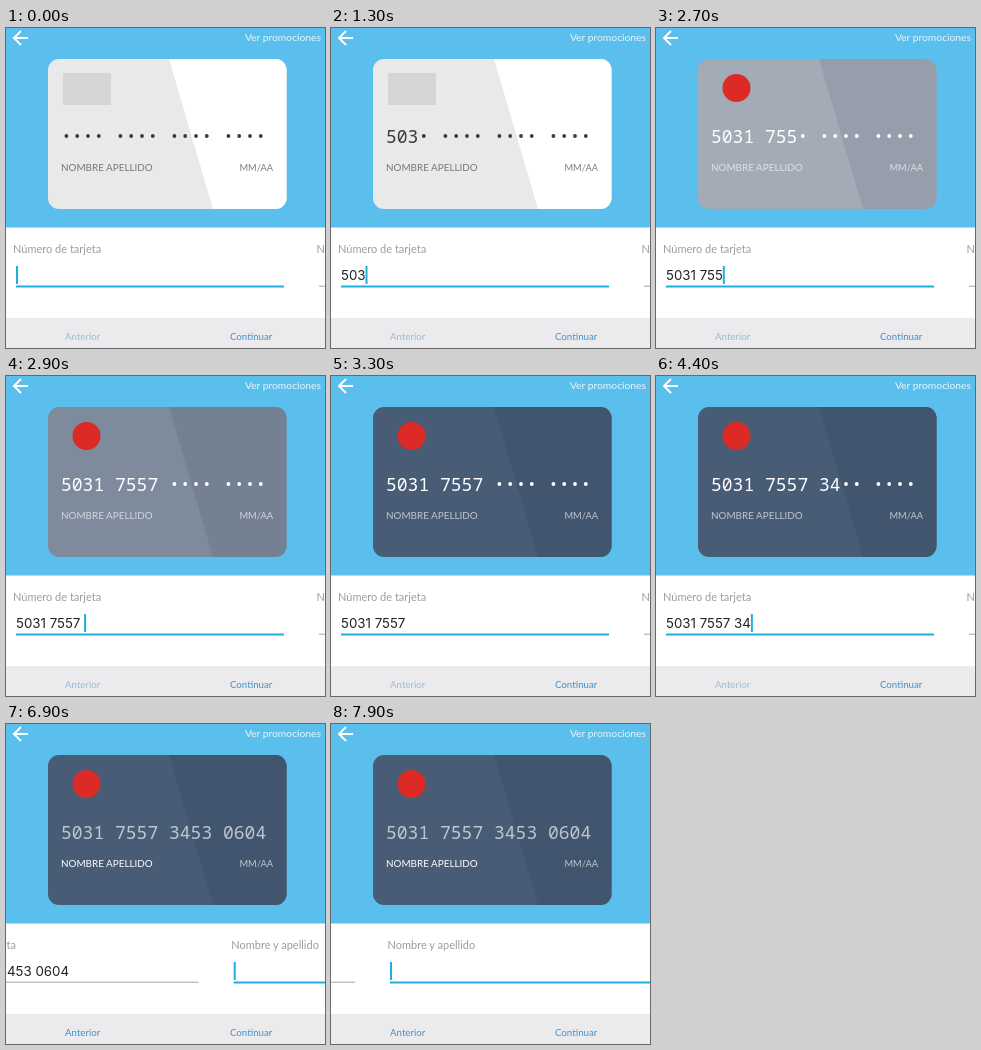
Write an HTML page that moves like this. It is 319 px wide and 320 px high and loops after 8000 ms.

```html
<!DOCTYPE html>
<html lang="es">
<head>
<meta charset="utf-8">
<style>
html, body { margin: 0; width: 100%; height: 100%; overflow: hidden; background: #fff; }
svg { display: block; width: 319px; height: 320px; font-family: Lato, sans-serif; }
text { white-space: pre; }
.label { font-size: 11px; fill: #9c9c9c; }
.button { font-size: 9.7px; fill: #438fc6; }
#digits { font: 18px "Noto Sans Mono", monospace; }
#typed { font: 13.3px Inter, sans-serif; fill: #222; }
</style>
</head>
<body>
<svg viewBox="0 0 319 320">
  <rect width="319" height="199.5" fill="#5bbfee"/>
  <path d="M15 3L8 10l7 7M8 10h14" fill="none" stroke="#fff" stroke-width="2"/>
  <text x="315" y="13" text-anchor="end" font-size="10.3" fill="#e6f6fd">Ver promociones</text>

  <clipPath id="shape"><rect x="42" y="31" width="238.5" height="150" rx="11"/></clipPath>
  <g clip-path="url(#shape)">
    <path id="left" d="M42 31h239v150H42z"/>
    <path id="right" d="M163 31h118v150H207z"/>
  </g>
  <rect id="chip" x="57" y="45" width="48" height="32" rx="1.5" fill="#d5d5d5"/>
  <circle id="brand" cx="80.5" cy="60" r="14" fill="#dc2a27"/>
  <g id="ink">
    <g id="number"><text id="digits" x="55" y="115"></text></g>
    <text id="holder" x="55" y="143" font-size="9.9">NOMBRE APELLIDO</text>
    <text x="267" y="143" text-anchor="end" font-size="9.3" opacity=".65">MM/AA</text>
  </g>

  <g id="form">
    <text class="label" x="7" y="225">Número de tarjeta</text>
    <text id="typed" x="10" y="252"></text>
    <rect id="line1" x="10" width="268"/>
    <text class="label" x="310.5" y="225">Nombre y apellido</text>
    <rect id="line2" x="313" width="268"/>
    <rect id="caret" y="238" width="2" height="18" fill="#20aee0"/>
  </g>

  <rect y="290" width="319" height="30" fill="#ebebee"/>
  <text id="back" class="button" x="59" y="311.5">Anterior</text>
  <text class="button" x="224" y="311.5">Continuar</text>
</svg>
<script>
const $ = id => document.getElementById(id);
const set = (id, attrs) => { for (const k in attrs) $(id).setAttribute(k, attrs[k]); };
const ramp = (t, a, b) => Math.min(1, Math.max(0, (t - a) / (b - a)));
const mix = (a, b, p) => `rgb(${a.map((v, i) => Math.round(v + (b[i] - v) * p))})`;

const LOOP = 8000, BRAND_AT = 2300, SLIDE_AT = 6850, SHIFT = 254;
const CARD = '5031755734530604';
const KEYS = [600, 900, 1200, 1500, 2000, 2260, 2550, 2800,
  3900, 4200, 4800, 5100, 5500, 5800, 6150, 6450];
const group = s => s.replace(/(.{4})(?=.)/g, '$1 ');

const dots = KEYS.map((_, i) => {
  const dot = document.createElementNS('http://www.w3.org/2000/svg', 'circle');
  dot.setAttribute('cx', 60.4 + 10.8 * (i + Math.floor(i / 4)));
  dot.setAttribute('cy', 108);
  dot.setAttribute('r', 1.9);
  $('number').append(dot);
  return dot;
});

function underline(id, active) {
  set(id, active ? { y: 257.5, height: 2, fill: '#20aee0' }
                 : { y: 257.7, height: 1, fill: '#a3a3a3' });
}

function draw(t) {
  const count = KEYS.filter(k => k <= t).length;
  const text = CARD.slice(0, count);
  const branded = t >= BRAND_AT, onName = t >= SLIDE_AT;

  // card face
  const tint = ramp(t, 2340, 3200), show = ramp(t, 2270, 2680);
  set('left', { fill: branded ? mix([228, 228, 231], [72, 92, 117], tint) : '#e9e9e9' });
  set('right', { fill: branded ? mix([211, 211, 215], [66, 85, 110], tint) : '#fff' });
  set('chip', { opacity: 1 - show });
  set('brand', { opacity: show });
  set('ink', { fill: branded ? '#fff' : '#3a3a3a' });
  set('number', { opacity: onName ? 0.65 : 1 });
  set('holder', { opacity: onName ? 1 : 0.65 });
  $('digits').textContent = group(text);
  dots.forEach((d, i) => d.setAttribute('visibility', i < count ? 'hidden' : 'visible'));

  // form
  const slide = 1 - (1 - ramp(t, SLIDE_AT, SLIDE_AT + 400)) ** 3;
  set('form', { transform: `translate(${-SHIFT * slide} 0)` });
  const gap = count && count < 16 && count % 4 === 0 ? ' ' : '';
  $('typed').textContent = group(text) + gap;
  underline('line1', !onName);
  underline('line2', onName);

  // the caret restarts its blink after each key
  const last = onName ? SLIDE_AT : count ? KEYS[count - 1] : 0;
  set('caret', {
    x: onName ? 313 : 10 + (count ? $('typed').getComputedTextLength() : 0),
    visibility: (t - last) % 1000 < 500 ? 'visible' : 'hidden'
  });
  set('back', { opacity: onName ? 1 : 0.5 });
}

function frame() {
  draw(performance.now() % LOOP);
  requestAnimationFrame(frame);
}
frame();
</script>
</body>
</html>
```
